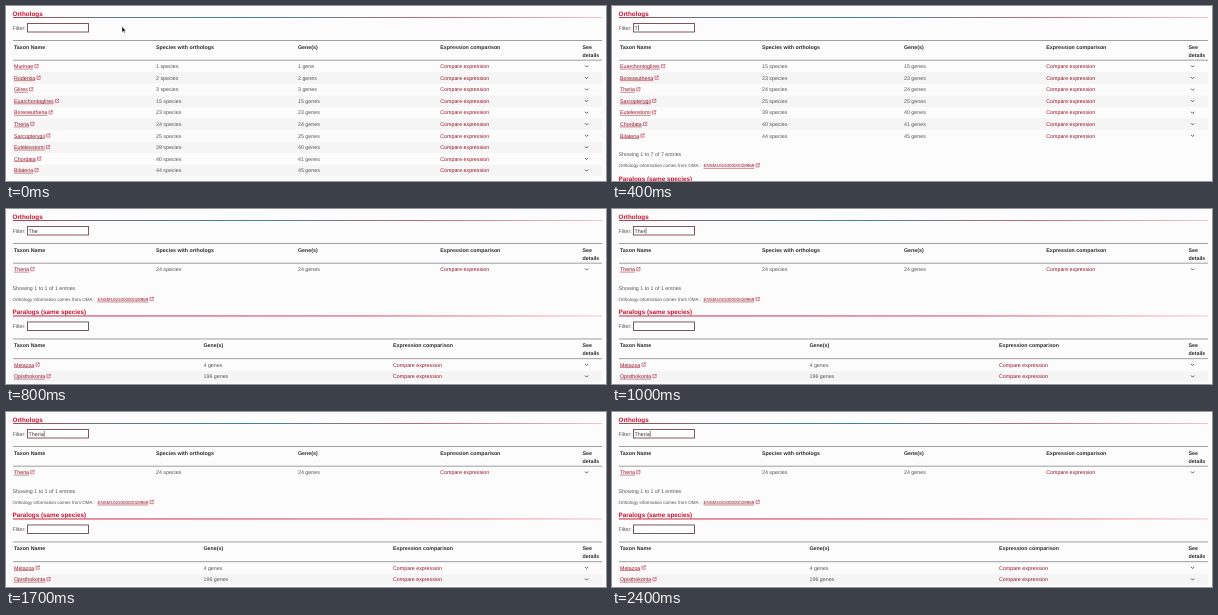
An HTML page for the animation above (2.5 s loop, 600 by 175 pixels).

```html
<!DOCTYPE html>
<html lang="en">
<head>
<meta charset="utf-8">
<title>Orthologs filter</title>
<style>
html, body { margin: 0; width: 100%; height: 100%; overflow: hidden; background: #fdfcfd; }
svg { display: block; }
text { font: 5.3px "Liberation Sans", Arial, sans-serif; fill: #555; text-rendering: geometricPrecision; white-space: pre; }
.head { font-size: 6.32px; font-weight: bold; fill: #c8102e; }
.th { font-weight: bold; fill: #2b2b2b; }
.link { fill: #951225; }
.small { font-size: 4.55px; }
.typed { fill: #333; }
</style>
</head>
<body>
<svg id="stage" width="600" height="175" viewBox="0 0 600 175">
  <defs>
    <linearGradient id="mixed">
      <stop offset="0" stop-color="#b8404f"/>
      <stop offset=".12" stop-color="#6f6f78"/>
      <stop offset=".4" stop-color="#3f8588"/>
      <stop offset=".7" stop-color="#b5707c"/>
      <stop offset="1" stop-color="#efc6cc"/>
    </linearGradient>
    <linearGradient id="red">
      <stop offset="0" stop-color="#cc1f3c"/>
      <stop offset=".6" stop-color="#d5465c"/>
      <stop offset="1" stop-color="#f0c6cc"/>
    </linearGradient>
  </defs>
</svg>
<script>
const PITCH = 11.56;
const stage = document.getElementById('stage');

function add(parent, tag, attrs = {}, content = '') {
  const node = document.createElementNS('http://www.w3.org/2000/svg', tag);
  for (const key in attrs) node.setAttribute(key, attrs[key]);
  node.textContent = content;
  return parent.appendChild(node);
}
const text = (g, x, y, content, cls = '') => add(g, 'text', { x, y, class: cls }, content);
const path = (g, d, stroke, width) =>
  add(g, 'path', { d, fill: 'none', stroke, 'stroke-width': width });
const shift = (node, y) => node.setAttribute('transform', `translate(0 ${y})`);
const show = (node, on) => node.setAttribute('visibility', on ? 'visible' : 'hidden');

// Underlined link followed by a small "opens elsewhere" icon
function outLink(g, x, y, label, cls = '') {
  const end = x + text(g, x, y, label, 'link ' + cls).getComputedTextLength();
  path(g, `M${x} ${y + .9}H${end}`, '#951225', .5);
  path(g, `M${end + 3.3} ${y - 3.6}h-1.6v3.2h3.2v-1.6M${end + 3} ${y - 1.8}l2-2m-1.4 0h1.4v1.4`, '#c0354a', .6);
}

function section(title, gradient, border, cols, data) {
  const g = add(stage, 'g');
  text(g, 6.5, 9.9, title, 'head');
  add(g, 'rect', { x: 7, y: 11, width: 589, height: 1, fill: `url(#${gradient})` });
  text(g, 6.5, 23.7, 'Filter:');
  add(g, 'rect', { x: 21.5, y: 17.5, width: 61, height: 8.5, fill: '#fff', stroke: border, 'stroke-width': .9 });
  path(g, 'M7 34.5H596', '#777', .7);
  path(g, 'M7 54.2H596', '#777', .7);
  cols.forEach(([x, label]) => text(g, x, 42.9, label, 'th'));
  text(g, 576.5, 42.9, 'See', 'th');
  text(g, 576.5, 50.6, 'details', 'th');

  const rows = data.map(([name, ...cells]) => {
    const row = add(g, 'g');
    const stripe = add(row, 'rect', { x: 7, y: 54.7, width: 589, height: PITCH, fill: '#f6f5f6' });
    outLink(row, 8, 62.2, name);
    [...cells, 'Compare expression'].forEach((cell, i) =>
      text(row, cols[i + 1][0], 62.2, cell, i === cells.length ? 'link' : ''));
    path(row, 'M579 59.5l1.6 1.6l1.6-1.6', '#333', .8);
    return { name, row, stripe };
  });

  function filter(keep) {
    let n = 0;
    for (const { name, row, stripe } of rows) {
      const on = keep(name);
      row.setAttribute('display', on ? 'inline' : 'none');
      if (!on) continue;
      shift(row, n * PITCH);
      stripe.setAttribute('opacity', n++ % 2);
    }
    return n;
  }
  return { g, filter };
}

const count = (n, unit) => `${n} ${unit}${n > 1 ? 's' : ''}`;
const taxa = [
  ['Murinae', 1, 1], ['Rodentia', 2, 2], ['Glires', 3, 3], ['Euarchontoglires', 15, 15],
  ['Boreoeutheria', 23, 23], ['Theria', 24, 24], ['Sarcopterygii', 25, 25],
  ['Euteleostomi', 39, 40], ['Chordata', 40, 41], ['Bilateria', 44, 45]
];
const orthologs = section('Orthologs', 'mixed', '#75464b',
  [[8, 'Taxon Name'], [150, 'Species with orthologs'], [292, 'Gene(s)'], [434.3, 'Expression comparison']],
  taxa.map(([name, species, genes]) => [name, species + ' species', count(genes, 'gene')]));

const below = add(stage, 'g');
const summary = text(below, 6.5, 69, '');
text(below, 6.5, 80.5, 'Orthology information comes from OMA :', 'small');
outLink(below, 91.5, 80.5, 'ENSMUSG00000028969', 'small');

const paralogs = section('Paralogs (same species)', 'red', '#62494c',
  [[8, 'Taxon Name'], [197.5, 'Gene(s)'], [387, 'Expression comparison']],
  [['Metazoa', '4 genes'], ['Opisthokonta', '196 genes']]);
paralogs.filter(() => true);

const typed = text(stage, 22.6, 23.7, '', 'typed');
const caret = add(stage, 'rect', { y: 18.8, width: .6, height: 6, fill: '#333' });
const pointer = add(stage, 'path', {
  d: 'M116 20.6v5.6l1.3-1.2l.9 2l.9-.4l-.9-1.9h1.7z', fill: '#111', stroke: '#fff', 'stroke-width': .3
});

// Start time in ms of each typed length
const keys = [0, 200, 700, 800, 1000, 1300, 1700];
const matches = [
  () => true,
  name => !['Murinae', 'Rodentia', 'Glires'].includes(name),
  name => ['Theria', 'Euteleostomi', 'Chordata', 'Bilateria'].includes(name),
  name => name === 'Theria'
];

let shown = -1;
function type(length) {
  shown = length;
  typed.textContent = 'Theria'.slice(0, length);
  caret.setAttribute('x', 22.8 + (length ? typed.getComputedTextLength() : 0));
  show(caret, length > 0 && length !== 3);
  show(pointer, length === 0);
  const n = orthologs.filter(matches[Math.min(length, 3)]);
  summary.textContent = `Showing 1 to ${n} of ${n} entries`;
  shift(below, n * PITCH);
  shift(paralogs.g, 83.9 + n * PITCH);
}

const start = performance.now();
function frame() {
  const t = (performance.now() - start) % 2500;
  const length = keys.filter(k => k <= t).length - 1;
  if (length !== shown) type(length);
  requestAnimationFrame(frame);
}
frame();
</script>
</body>
</html>
```
